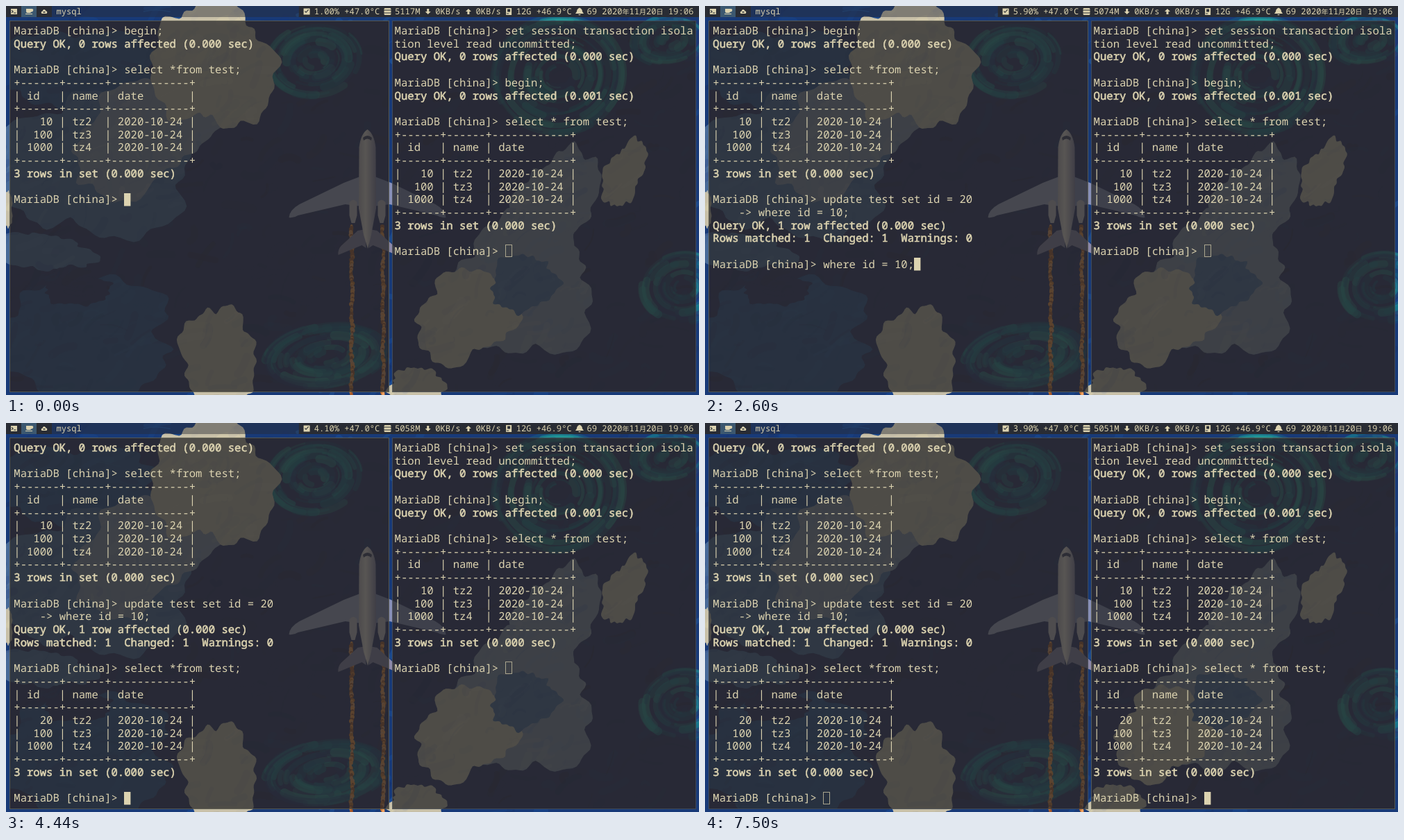
Write an HTML page with a canvas that moves like this. It is 998 px wide and 561 px high and loops after 8 s.

```html
<!DOCTYPE html>
<html lang="en">
<head>
<meta charset="utf-8">
<title>Two terminals</title>
<style>
html, body { margin: 0; height: 100%; overflow: hidden; background: #183a78; }
canvas { display: block; width: 100vw; height: 100vh; }
</style>
</head>
<body>
<canvas id="stage" width="998" height="561"></canvas>
<script>
const W = 998, H = 561, LOOP = 8000;
const FONT = 15.593, CELL = FONT * 0.6, ROW = FONT * 1.2, TOP = 26.4;
const BAR_FONT = 12.13, BAR_CELL = BAR_FONT * 0.6;
const INK = '#dcd3b0', DARK = '#292c34';
const stage = document.getElementById('stage');
const wall = Object.assign(document.createElement('canvas'), { width: W, height: H });

let seed = 4711;
const rnd = (a, b) => a + (b - a) * ((seed = seed * 16807 % 2147483647) / 2147483647);
const pick = list => list[Math.floor(rnd(0, list.length))];

// ---------- wallpaper ----------
function paintWall(c) {
  const navy = ['#28305f', '#1c2858', '#352c52', '#22396f', '#2a2440'];
  const deep = ['#28508c', '#204478', '#306098', '#2a3c70'];
  const slate = ['#486a98', '#3c5c90', '#5878a0', '#34508a'];
  const grey = ['#8490a4', '#7088ac', '#9aa0a8', '#6078a0'];
  const tan = ['#c8c0a8', '#b4b0a8', '#dcd2ae', '#a8a8a8'];
  const teal = ['#127a8c', '#1d9a98', '#156080', '#2cae9c', '#263470'];

  function strokes(n, tones, x, y, w, h) {
    c.lineCap = 'round';
    for (let i = 0; i < n; i++) {
      const dir = rnd(-1.3, 0.3), len = rnd(8, 40);
      c.globalAlpha = rnd(0.15, 0.45);
      c.strokeStyle = pick(tones);
      c.lineWidth = rnd(1, 12);
      c.save();
      c.translate(x + rnd(0, w), y + rnd(0, h));
      c.rotate(dir);
      c.beginPath();
      c.moveTo(-len / 2, 0);
      c.quadraticCurveTo(0, rnd(-9, 9), len / 2, 0);
      c.stroke();
      c.restore();
    }
    c.globalAlpha = 1;
  }

  // Ellipse with a wavy edge, filled with brush marks.
  function cloud(tones, x, y, rx, ry, tilt = 0) {
    const waves = [2, 3, 5, 8, 13, 21].map(k => [k, rnd(0, 6.3), 0.22 / Math.sqrt(k) / 1.6]);
    c.save();
    c.translate(x, y);
    c.rotate(tilt);
    c.beginPath();
    for (let a = 0; a < 6.28; a += 0.05) {
      const r = waves.reduce((sum, [k, phase, amp]) => sum + amp * Math.sin(k * a + phase), 1);
      c.lineTo(rx * r * Math.cos(a), ry * r * Math.sin(a));
    }
    c.fillStyle = tones[0];
    c.fill();
    c.clip();
    strokes(rx * ry / 70, tones, -rx * 1.2, -ry * 1.2, rx * 2.4, ry * 2.4);
    c.restore();
  }

  function swirl(x, y, rx, ry) {
    for (let i = 0; i < rx; i++) {
      const k = Math.sqrt(rnd(0.02, 1)), a = rnd(0, 6.3);
      c.globalAlpha = rnd(0.2, 0.55);
      c.strokeStyle = pick(teal);
      c.lineWidth = rnd(2, 13);
      c.beginPath();
      c.ellipse(x, y, rx * k, ry * k, -0.15, a, a + rnd(0.4, 1.6));
      c.stroke();
    }
    c.globalAlpha = 1;
  }

  c.fillStyle = '#183a78';
  c.fillRect(0, 0, W, H);
  strokes(500, ['#123a80', '#2569b4', '#183064', '#1a57a8'], 0, 0, W, H);
  c.save();
  c.beginPath();
  c.rect(6, 22, 545, 534);
  c.rect(557, 22, 436, 534);
  c.clip();
  c.fillStyle = navy[0];
  c.fillRect(0, 0, W, H);
  strokes(500, navy, 0, 20, W, 540);
  cloud(deep, 110, 480, 140, 80);
  cloud(deep, 90, 90, 120, 60);
  c.restore();

  swirl(445, 78, 68, 52);
  swirl(795, 100, 95, 85);
  swirl(955, 50, 55, 35);
  swirl(462, 505, 92, 45);
  swirl(975, 405, 60, 50);

  // clouds of the left half
  cloud(slate, 125, 230, 140, 105, -0.2);
  cloud(slate, 55, 355, 65, 28, 0.1);
  cloud(navy, 100, 405, 50, 26);
  cloud(grey, 205, 180, 115, 75, -0.5);
  cloud(tan, 298, 85, 82, 98, -0.1);
  cloud(tan, 308, 515, 55, 80);
  cloud(tan, 0, 292, 9, 28);

  // clouds of the right half
  cloud(grey, 785, 300, 58, 95, 0.35);
  cloud(grey, 745, 405, 105, 95, -0.3);
  cloud(tan, 665, 445, 75, 65, -0.4);
  cloud(slate, 745, 400, 50, 38, -0.5);
  cloud(tan, 890, 242, 28, 48, 0.35);
  cloud(tan, 590, 548, 38, 28);

  // exhaust trails
  for (const x of [498, 543]) {
    for (let y = 318; y < H; y += 2) {
      c.fillStyle = pick(['#ff9a40', '#d07830', '#f0a060', '#a85828']);
      c.beginPath();
      c.ellipse(x + Math.sin(y / 9) + rnd(-1, 1), y, rnd(1.5, 3.2), 3, 0, 0, 7);
      c.fill();
    }
  }

  // airplane, mirrored about its long axis
  const poly = (fill, d) => { c.fillStyle = fill; c.fill(new Path2D(d)); };
  for (const side of [-1, 1]) {
    c.save();
    c.translate(520.5, 0);
    c.scale(side, 1);
    poly(side < 0 ? '#a8acc8' : '#8890b8', 'M8 245 L34 255 L98 286 Q112 294 113 305 Q106 306 100 302 L32 286 L8 289 Z');
    poly('#8c88a8', 'M3 322 L14 324 L38 346 Q43 352 42 359 L8 345 L2 349 Z');
    poly('#c8c0c4', 'M15 283 Q20 276 26 283 L26 302 L23 313 H18 L15 302 Z');
    c.restore();
  }
  const hull = c.createLinearGradient(508, 0, 533, 0);
  hull.addColorStop(0, '#c4bcbc');
  hull.addColorStop(0.4, '#f4e8dc');
  hull.addColorStop(1, '#8a86a4');
  poly(hull, 'M520.5 178 Q530 184 532.5 204 L533 292 L526 330 L521 350 L515 330 L508 292 L508.5 204 Q511 184 520.5 178 Z');
  poly('#40405c', 'M514 190 Q520.5 184 527 190 L526 194 Q520.5 189 515 194 Z');

  // translucent windows and bar
  c.fillStyle = 'rgba(40,40,42,.76)';
  c.fillRect(5, 21, 547, 536);
  c.fillRect(556, 21, 438, 536);
  c.fillStyle = 'rgba(40,44,52,.45)';
  c.fillRect(0, 0, W, 16);
}

// ---------- terminal contents ----------
const PROMPT = 'MariaDB [china]> ';
const RULE = '+------+------+------------+';
const ok = (sec = '0.000') => `Query OK, 0 rows affected (${sec} sec)`;
const table = first => [
  RULE, '| id   | name | date       |', RULE,
  ...[first, 100, 1000].map((id, i) => `| ${String(id).padStart(4)} | tz${i + 2}  | 2020-10-24 |`),
  RULE, '3 rows in set (0.000 sec)', ''
];

const leftStart = [PROMPT + 'begin;', ok(), '', PROMPT + 'select *from test;', ...table(10)];
const leftUpdated = [...leftStart, PROMPT + 'update test set id = 20', '    -> where id = 10;',
  'Query OK, 1 row affected (0.000 sec)', 'Rows matched: 1  Changed: 1  Warnings: 0', ''];
const leftSelected = [...leftUpdated, PROMPT + 'select *from test;', ...table(20)].slice(1);
const rightStart = [PROMPT + 'set session transaction isola', 'tion level read uncommitted;', ok(), '',
  PROMPT + 'begin;', ok('0.001'), '', PROMPT + 'select * from test;', ...table(10)];
const rightSelected = [...rightStart, PROMPT + 'select * from test;', ...table(20)];

// Each step: start time, lines on screen, text at the prompt.
const leftSteps = [
  [0, leftStart, ''],
  [1000, leftUpdated, ''],
  [2310, leftUpdated, 'update test set id = 20 where id = 10;'],
  [2600, leftUpdated, 'where id = 10;'],
  [3540, leftUpdated, 'update test set id = 20'],
  [3940, leftUpdated, 'select *from test;'],
  [4440, leftSelected, '']
];
const rightSteps = [
  [0, rightStart, ''],
  [6290, rightStart, 'select * from test;'],
  [7280, rightSelected, '']
];
const current = (steps, t) => steps.filter(s => s[0] <= t).pop();

const g = stage.getContext('2d');
g.textRendering = 'geometricPrecision';

function terminal(x, lines, input, focused) {
  g.fillStyle = g.strokeStyle = INK;
  g.font = `${FONT}px "Noto Sans Mono", monospace`;
  g.lineWidth = 0.6;
  [...lines, PROMPT + input].forEach((line, i) => {
    const y = TOP + i * ROW + 14.6;
    g.fillText(line, x, y);
    if (/^(Query|Rows|\d rows)/.test(line)) g.strokeText(line, x, y);
  });
  const cx = Math.round(x + (PROMPT.length + input.length) * CELL), cy = Math.round(TOP + lines.length * ROW);
  if (focused) return g.fillRect(cx, cy, 9.4, 18.5);
  g.strokeStyle = '#aaa58e';
  g.lineWidth = 1;
  g.strokeRect(cx + 0.5, cy + 0.5, 9, 17);
}

function border(x, w, focused) {
  g.strokeStyle = focused ? 'rgba(125,125,105,.55)' : 'rgba(95,105,115,.5)';
  g.lineWidth = 1;
  g.strokeRect(x + 0.5, 21.5, w, 535);
}

// ---------- status bar ----------
// Icons are drawn around the origin, holes by the even-odd rule.
const icons = Object.fromEntries(Object.entries({
  shell: 'M-4 -4H5V4H-4Z M-3 -2.5L0 0L-3 2.5V1L-1.5 0L-3 -1Z M0 1.5H3.5V2.5H0Z',
  cup: 'M-4 -4H4Q7 -4 6 -1Q5 1 3 .5Q3 2 1 2H-2Q-4 2 -4 0Z M-5 3H5V4H-5Z',
  cloud: 'M-3.5 3Q-5.5 0 -2.5 -.5Q-.5 -5 2.5 -1Q5.5 0 3.5 3Z M-1.5 0H1.5V1.5H-1.5Z',
  load: 'M-4.5 -4.5H4.5V4.5H-4.5Z M-3 0L-1 2L3 -2.5L2 -3L-1 .5L-2 -1Z',
  disk: 'M-4 -5H4L5 -4V-2.5H-5V-4Z M-5 -1.5H5V1.5H-5Z M-5 2.5H5V4L4 5H-4L-5 4Z',
  down: 'M-1.5 -4H1.5V0H4L0 4L-4 0H-1.5Z',
  up: 'M-1.5 4H1.5V0H4L0 -4L-4 0H-1.5Z',
  drive: 'M-4 -5H4V5H-4Z M-2 -3.5H2V.5H-2Z M-3 2.5H0V3.5H-3Z',
  bell: 'M0 -5.5Q4 -4 4 0L6 3H-6L-4 0Q-4 -4 0 -5.5Z M-2 4H2L0 5.5Z'
}).map(([name, d]) => [name, new Path2D(d)]));

function icon(name, x) {
  g.save();
  g.translate(x, 8);
  g.fill(icons[name], 'evenodd');
  g.restore();
}

function write(text, x) {
  const wide = /[年月日]/.test(text);
  g.font = wide ? '10px "Noto Sans CJK SC", "Noto Sans CJK", sans-serif' : `${BAR_FONT}px "Noto Sans Mono", monospace`;
  g.fillText(text, x, 12.2);
  return x + g.measureText(text).width;
}

function statusBar(load, memory) {
  let x = 421.8 - (load.length - 4) * BAR_CELL;
  g.fillStyle = DARK;
  g.fillRect(0, 0, 66, 16);
  g.fillRect(x, 0, W - x, 16);
  g.fillStyle = '#3c5870';
  g.fillRect(22, 0, 22, 16);

  g.fillStyle = INK;
  ['shell', 'cup', 'cloud'].forEach((name, i) => icon(name, 11 + 22 * i));
  write('mysql', 72.5);
  const fields = { load: `${load}% +47.0°C`, disk: memory + 'M', down: '0KB/s', up: '0KB/s', drive: '12G +46.9°C', bell: '69 ' };
  for (const [name, text] of Object.entries(fields)) {
    icon(name, x + 1.55 * BAR_CELL);
    x = write(text, x + 3 * BAR_CELL);
  }
  for (const part of ['2020', '年', '11', '月', '20', '日', ' 19:06']) x = write(part, x);
}

const readings = [['1.00', 5117], ['2.00', 5113], ['10.40', 5093], ['5.90', 5074],
  ['4.10', 5058], ['3.20', 5050], ['2.50', 5044], ['3.90', 5051]];

function draw() {
  const t = performance.now() % LOOP;
  const [, leftLines, leftInput] = current(leftSteps, t);
  const [, rightLines, rightInput] = current(rightSteps, t);
  const tick = t < 40 ? 0 : 1 + Math.floor(t / 1250);
  const leftFocus = t < 5830, rightFocus = t >= 5890;
  g.drawImage(wall, 0, 0);
  border(5, 546, leftFocus);
  border(556, 437, rightFocus);
  terminal(11.3, leftLines, leftInput, leftFocus);
  terminal(559.6, rightLines, rightInput, rightFocus);
  statusBar(...readings[tick]);
  requestAnimationFrame(draw);
}

paintWall(wall.getContext('2d'));
draw();
</script>
</body>
</html>
```
